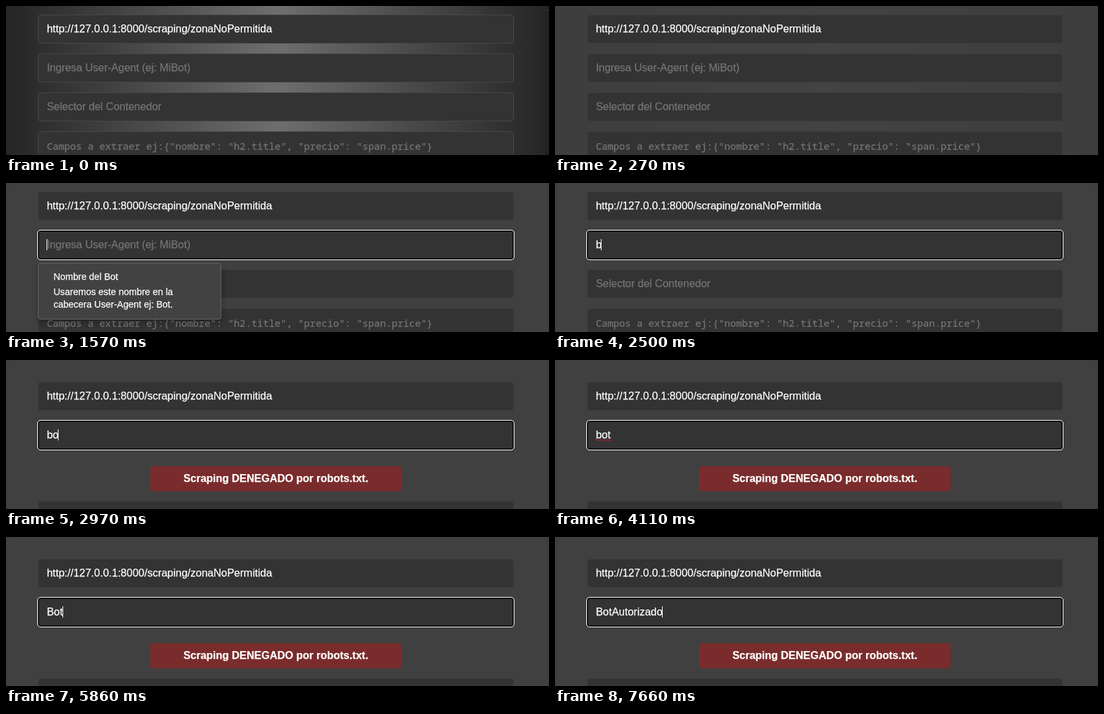
Animation, 817 px wide and 226 px high, one loop 8000 ms. Source, as an HTML page:

```html
<!DOCTYPE html>
<html lang="es">
<head>
<meta charset="utf-8">
<style>
  html, body { margin: 0; width: 100%; height: 100%; overflow: hidden; background: #404040; }
  #stage {
    position: relative; width: 817px; height: 226px; overflow: hidden;
    background: #404040; color: #fff; font: 16px/18px "Liberation Sans", Arial, sans-serif;
    -webkit-text-stroke: .25px;
  }
  #stage div { position: absolute; box-sizing: border-box; white-space: pre; }
  #glow {
    inset: 0;
    background: linear-gradient(90deg, #262626, #292929 3%, #6e6e6e 50%, #292929 97%, #222);
    animation: fade 8s step-end infinite;
  }
  @keyframes fade {
    0% { opacity: 1; }
    1.625% { opacity: .66; }
    2.5% { opacity: .33; }
    3.375% { opacity: .07; }
    6% { opacity: .04; }
    9.5%, 100% { opacity: 0; }
  }
  .notch { top: 6px; width: 6px; height: 1px; background: #353535; }
  .field {
    left: 48px; width: 716px; height: 44px; padding: 12px 12.4px;
    background: #333; border: 1px solid #3d3d3d; border-radius: 4px;
    animation: edge 8s step-end infinite;
  }
  @keyframes edge {
    0% { border-color: #484848; }
    1.625% { border-color: #444; }
    3.375%, 100% { border-color: #3d3d3d; }
  }
  .hint { color: #757575; }
  #fields { font: 14.67px/19px "Noto Sans Mono", "DejaVu Sans Mono", monospace; height: 80px; }
  #ring {
    left: 47px; width: 718px; height: 46px;
    border: 1px solid #fff; border-radius: 5px; box-shadow: inset 0 0 0 2px #101010;
  }
  #caret { width: 1px; height: 17px; background: #fff; }
  #wave { position: absolute; left: 61px; top: 119px; }
  #tip {
    left: 48px; top: 121px; width: 276px; height: 86px; padding: 11px 22.4px;
    background: #424242; border: 1px solid #666; border-radius: 4px;
    box-shadow: 0 4px 8px rgba(0, 0, 0, .3);
    font-size: 14px; line-height: 19px; animation: tip 8s step-end infinite;
  }
  #tip b { display: block; font-weight: normal; margin-bottom: 4px; }
  @keyframes tip {
    0% { opacity: 0; transform: none; }
    16.25% { opacity: .5; transform: translateY(10px); }
    17.125% { opacity: 1; transform: none; }
    23.75% { opacity: .65; }
    24.625% { opacity: .3; }
    26.25%, 100% { opacity: 0; }
  }
  #alert {
    left: 217px; top: 161px; width: 378px; height: 38px; border-radius: 4px;
    background: #7a2c2c; font-weight: bold; line-height: 37px; text-align: center;
  }
</style>
</head>
<body>
<div id="stage">
  <div id="glow"></div>
  <div class="notch" style="left:0"></div>
  <div class="notch" style="left:811px"></div>
  <div class="field" id="url">http://127.0.0.1:8000/scraping/zonaNoPermitida</div>
  <div class="field" id="agent"><span id="typed"></span></div>
  <div id="ring"></div>
  <div id="caret"></div>
  <svg id="wave" width="24" height="5"><path d="M0 2.5q1.5-3 3 0t3 0 3 0 3 0 3 0 3 0 3 0 2 0" fill="none" stroke="#e01b24"/></svg>
  <div class="field hint" id="box">Selector del Contenedor</div>
  <div class="field hint" id="fields">Campos a extraer ej:{"nombre": "h2.title", "precio": "span.price"}</div>
  <div id="alert">Scraping DENEGADO por robots.txt.</div>
  <div id="tip"><b>Nombre del Bot</b>Usaremos este nombre en la
cabecera User-Agent ej: Bot.</div>
</div>
<script>
  const LOOP = 8000;
  const HINT = "Ingresa User-Agent (ej: MiBot)";
  const $ = id => document.getElementById(id);

  const typing = [
    [0, ""], [2500, "b"], [2900, "bo"], [3120, "bot"],
    [4250, "bo"], [4450, "b"], [4650, ""],
    [5050, "B"], [5330, "Bo"], [5460, "Bot"],
    [6200, "BotA"], [6530, "BotAu"], [6670, "BotAut"], [6800, "BotAuto"],
    [6930, "BotAutor"], [7060, "BotAutori"], [7260, "BotAutoriz"],
    [7460, "BotAutoriza"], [7560, "BotAutorizad"], [7660, "BotAutorizado"]
  ];
  const caretOn = [[1570, 2100], [2500, 3580], [4180, 6000], [6200, LOOP]];
  const denied = [[2900, 5050], [5860, LOOP]];

  const within = (t, spans) => spans.some(([a, b]) => t >= a && t < b);
  const show = (id, on) => { $(id).style.visibility = on ? "visible" : "hidden"; };
  const place = (id, y) => { $(id).style.top = y + "px"; };

  function draw(t) {
    const text = typing.filter(([at]) => at <= t).pop()[1];
    const blocked = within(t, denied);
    const dy = blocked ? 20 : 0;

    place("url", 13 + dy);
    place("agent", 72 + dy);
    place("ring", 71 + dy);
    place("caret", 85 + dy);
    place("box", blocked ? 214 : 131);
    place("fields", blocked ? 273 : 190);

    const typed = $("typed");
    typed.textContent = text || HINT;
    typed.className = text ? "" : "hint";
    const end = text ? typed.getBoundingClientRect().width : 0;
    $("caret").style.left = Math.floor(61.05 + end) + "px";

    show("ring", t >= 1570);
    show("caret", within(t, caretOn));
    show("wave", t >= 4110 && t < 4250);
    show("alert", blocked);
  }

  // One clock for the script and the keyframes.
  const start = performance.now();
  const anims = document.getAnimations();
  function tick() {
    const t = Math.max(0, performance.now() - start) % LOOP;
    anims.forEach(a => { a.currentTime = t; });
    draw(t);
    requestAnimationFrame(tick);
  }
  tick();
</script>
</body>
</html>
```
